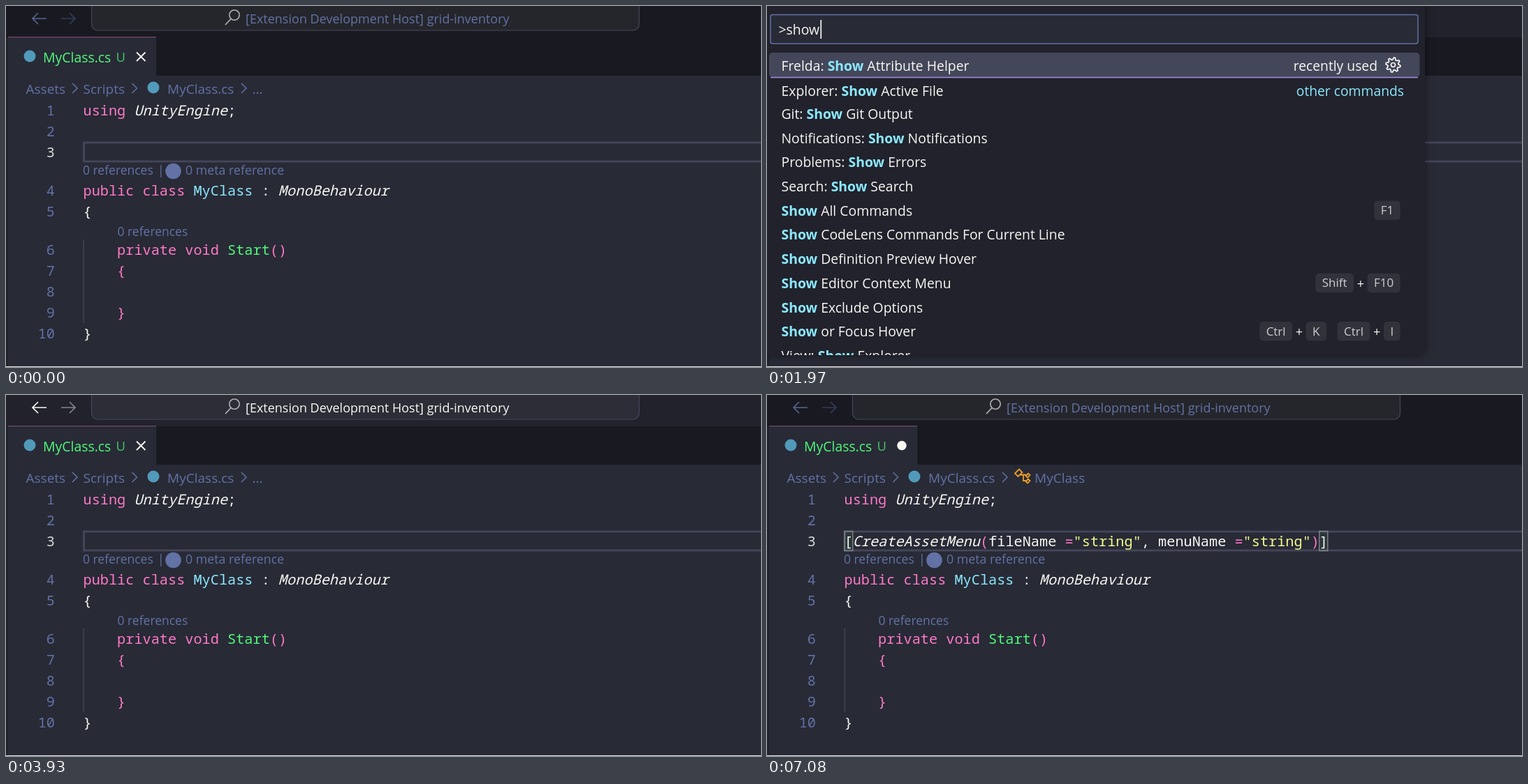
Animation, 1081 px wide and 518 px high, one loop 7.13 s. Source, as an HTML page:

```html
<!DOCTYPE html>
<html lang="en">
<head>
<meta charset="utf-8">
<title>Attribute helper demo</title>
<style>
  html, body { margin: 0; width: 100%; height: 100%; overflow: hidden; background: #282a36; }
  svg { display: block; width: 100%; height: 100%; }
  text { white-space: pre; font-family: "Open Sans", "Noto Sans", sans-serif; }
  .code { font-family: "Noto Sans Mono", "DejaVu Sans Mono", monospace; font-size: 20.25px; font-weight: 500; }
  .number { font-weight: 400; }
  .hit { font-weight: 700; fill: #8be9fd; }
</style>
</head>
<body>
<svg id="stage" viewBox="0 0 1081 518" xmlns="http://www.w3.org/2000/svg"></svg>
<script>
const LOOP = 7130;
const FG = '#f8f8f2', MUTED = '#6272a4', PINK = '#ff79c6', CYAN = '#8be9fd',
      GREEN = '#50fa7b', YELLOW = '#f1fa8c', DARK = '#191a21', PANEL = '#21222c',
      EDITOR = '#282a36', SELECT = '#44475a', ORANGE = '#ee9d28', BLUE = '#75beff';
const UI = 19.4, ROW = 34.7, LIST_TOP = 67, LIST_END = 501;

const stage = document.getElementById('stage');
const pen = document.createElement('canvas').getContext('2d');

function widthOf(str, size) {
  pen.font = `${size}px "Open Sans", "Noto Sans", sans-serif`;
  return pen.measureText(str).width;
}

// Drawing helpers
const rect = (x, y, w, h, fill, more = '') =>
  `<rect x="${x}" y="${y}" width="${w}" height="${h}" fill="${fill}" ${more}/>`;
const line = (d, color, w = 1.6) =>
  `<path d="${d}" fill="none" stroke="${color}" stroke-width="${w}"/>`;
const dot = (x, y, r, fill) => `<circle cx="${x}" cy="${y}" r="${r}" fill="${fill}"/>`;
const text = (x, y, str, fill = FG, size = UI, anchor = 'start') =>
  `<text x="${x}" y="${y}" fill="${fill}" font-size="${size}" text-anchor="${anchor}">${str}</text>`;
const at = (x, y, body) => `<g transform="translate(${x} ${y})">${body}</g>`;

// Each run is [text, color, italic]
const code = (x, y, ...runs) => `<text class="code" x="${x}" y="${y}">` +
  runs.map(([s, color = FG, italic]) =>
    `<tspan fill="${color}"${italic ? ' font-style="italic"' : ''}>${s}</tspan>`).join('') + '</text>';

const icons = {
  method: line('M0-10L9-5.5V5.5L0 10L-9 5.5V-5.5ZM-9-5.5L0-1L9-5.5M0-1V10', FG, 1.7),
  type: line('M-10.5-4.5l6-6 4.5 4.5-6 6zM-3-2.5h8.5M1.5-2.5v8.5h4' +
    'M5-1l3.5-3.5 2.5 2.5-3.5 3.5zM5 7l3.5-3.5 2.5 2.5-3.5 3.5z', ORANGE, 1.8),
  field: line('M-10.5-3L2-8.5L10.5-4.5V3.5L-2 9L-10.5 5ZM-10.5-3L-2 1L10.5-4.5M-2 1V9', BLUE, 1.7)
};

function gear() {
  const pts = [];
  for (let i = 0; i < 32; i++) {
    const a = (i + 0.5) * Math.PI / 16, r = i % 4 < 2 ? 10.5 : 7.6;
    pts.push(`${(r * Math.cos(a)).toFixed(2)} ${(r * Math.sin(a)).toFixed(2)}`);
  }
  return line(`M${pts.join('L')}Z`, FG, 1.7) +
    `<circle r="3" fill="none" stroke="${FG}" stroke-width="1.7"/>`;
}

// Window title, tab, breadcrumb
function chrome({ focus, dirty, crumb }) {
  const chevron = x => line(`M${x} 111l7 7-7 7`, MUTED, 1.5);
  const arrow = (x, dir, color) => line(`M${x} 18h${20 * dir}M${x + 8 * dir} 10l${-8 * dir} 8 ${8 * dir} 8`, color, 1.7);
  return rect(0, 0, 1081, 45, focus ? PANEL : DARK) +
    rect(122.5, -12, 784, 47, 'rgba(255,255,255,.05)', `rx="9" stroke="${SELECT}" stroke-width="1.2"`) +
    arrow(38, 1, focus ? FG : '#56648f') + arrow(99, -1, focus ? '#85858a' : '#353e59') +
    '<circle cx="327" cy="13" r="7.2" fill="none" stroke="#b0b0b2" stroke-width="1.6"/>' +
    line('M322 18.5l-8 8.5', '#b0b0b2', 1.8) +
    text(343, 25, '[Extension Development Host] grid-inventory', focus ? FG : MUTED, 18) +
    rect(215, 45, 866, 55, DARK) + rect(3, 45, 212, 55, EDITOR) + rect(3, 44, 212, 1.2, '#744a6c') +
    dot(34, 72, 8.5, '#519aba') +
    text(53, 81, 'MyClass.cs', GREEN, 19.4) + text(157.5, 80, 'U', '#42c968', 18.5) +
    (dirty ? dot(193, 72.5, 6.7, FG) : line('M187 66.5l12.5 12.5m0-12.5l-12.5 12.5', FG, 1.8)) +
    text(28.5, 125.5, 'Assets', MUTED, 19) + chevron(95) +
    text(110.5, 125.5, 'Scripts', MUTED, 19) + chevron(180.5) + dot(211, 117, 8.5, '#519aba') +
    text(231, 125.5, 'MyClass.cs', MUTED, 19) + chevron(337) +
    (crumb ? at(365.5, 117, icons.type) + text(383, 125.5, 'MyClass', MUTED, 19)
           : text(352.5, 125.5, '...', MUTED, 19));
}

function attribute(styled) {
  const str = ['"string"', styled ? YELLOW : FG], eq = ['=', styled ? PINK : FG];
  return code(110.5, 217, ['['], ['CreateAssetMenu', FG, styled], ['(', PINK], ['fileName '], eq, str,
    [', menuName '], eq, str, [')', PINK], [']']);
}

function editor({ caret, inserted, styled, brackets }) {
  const lines = [150, 180, 210, 265, 295, 350, 380, 410, 440, 470];
  const numbers = lines.map((y, i) =>
    `<text class="code number" x="70" y="${y + 7}" text-anchor="end" fill="${i === 2 ? '#d6d6d2' : MUTED}">${i + 1}</text>`);
  const box = x => rect(x, 195.5, 12, 28, 'rgba(80,250,123,.06)', 'stroke="#8a8b90" stroke-width="1.3"');
  return numbers.join('') +
    rect(111.5, 196, 1000, 27, 'none', `stroke="${SELECT}" stroke-width="2.8"`) +
    rect(110.5, 335, 1.4, 120, '#42444f') +
    code(110.5, 157, ['using ', PINK], ['UnityEngine', FG, true], [';']) +
    text(110, 242, '0 references', MUTED, 17.5) + text(217, 242, '|', MUTED, 17.5) +
    dot(239.5, 237, 11.3, MUTED) + text(257, 242, '0 meta reference', MUTED, 17.8) +
    code(110.5, 272, ['public class ', PINK], ['MyClass', CYAN], [' : '], ['MonoBehaviour', FG, true]) +
    code(110.5, 302, ['{']) + text(159.5, 330, '0 references', MUTED, 17.5) +
    code(159.1, 357, ['private void ', PINK], ['Start', GREEN], ['()', PINK]) +
    code(159.1, 387, ['{', PINK]) + code(159.1, 447, ['}', PINK]) + code(110.5, 477, ['}']) +
    (brackets ? box(110.8) + box(790.8) : '') +
    (inserted ? attribute(styled) : '') +
    (caret ? rect(caret, 194, 3, 31, FG) : '');
}

// Command list entries: [label, keys]
const recent = [
  ['Frelda: Show Attribute Helper'], ['Frelda: Focus on Meta Explorer View'],
  ['View: Close All Editors', 'Ctrl+K Ctrl+W'], ['Developer: Reload Window', 'Ctrl+R'],
  ['Extensions: Install from VSIX...'], ['Preferences: Open Settings (UI)'],
  ['Preferences: Color Theme', 'Ctrl+K Ctrl+T'], ['OmniSharp: Restart OmniSharp'],
  ['File: New Untitled Text File', 'Ctrl+N'], ['Git: Close All Diff Editors'],
  ['Developer: Reload Webviews']
];
const similar = [
  ['Show CodeLens Commands For Current Line'], ['Show Definition Preview Hover'],
  ['Show Editor Context Menu', 'Shift+F10'], ['Show Exclude Options'],
  ['Show or Focus Hover', 'Ctrl+K Ctrl+I']
];
const others = [
  ['.NET Install Tool: Report an issue with the .NET Install Tool.'], ['.NET: Build'],
  ['Explorer: Show Active File'], ['Git: Show Git Output'],
  ['Notifications: Show Notifications'], ['Problems: Show Errors'], ['Search: Show Search'],
  ['Show All Commands', 'F1'], ...similar,
  ['View: Show Explorer'], ['View: Show Extensions'], ['View: Show Testing']
];
const attributes = [
  ['ContextMenu', 'method'], ['CreateAssetMenu', 'type'], ['ExecuteInEditMode', 'type'],
  ['Header', 'field'], ['HideInInspector', 'field'], ['Multiline', 'field'], ['Range', 'field'],
  ['RequireComponent', 'type'], ['SerializeField', 'field'], ['Space', 'field'],
  ['TextArea', 'field'], ['Tooltip', 'field'], ['Min', 'field']
];

const filter = (list, query) => list.filter(([label]) => label.toLowerCase().includes(query));

function commandRows(query) {
  const q = query.trim(), fuzzy = q.startsWith('show a');
  const top = filter(recent, q).map(([label, keys]) => ({ label, keys, hit: q }));
  const source = !fuzzy ? filter(others, q) : q.length < 14 ? similar : [];
  const rest = source.map(([label, keys], i) => ({
    label, keys, hit: fuzzy ? '' : q,
    note: i ? '' : fuzzy ? 'similar commands' : 'other commands'
  }));
  return [...top, ...rest].slice(0, 13);
}

const attributeRows = query =>
  filter(attributes, query).map(([label, icon]) => ({ label, icon, hit: query }));

function marked(label, hit) {
  const i = hit ? label.toLowerCase().indexOf(hit) : -1;
  if (i < 0) return label;
  const end = i + hit.length;
  return `${label.slice(0, i)}<tspan class="hit">${label.slice(i, end)}</tspan>${label.slice(end)}`;
}

// Key caps laid out from the right edge
function keycaps(keys, y) {
  let x = 906, out = '';
  for (const chord of keys.split(' ').reverse()) {
    chord.split('+').reverse().forEach((key, i) => {
      if (i) {
        out += text(x - 10.5, y + 7.5, '+', FG, 18, 'middle');
        x -= 21;
      }
      const w = widthOf(key, 17) + 17.5;
      x -= w;
      out += rect(x, y - 13, w, 26, 'rgba(128,128,128,.17)', 'rx="4.5" stroke="#33343c" stroke-width="1.3"') +
        text(x + w / 2, y + 6, key, '#cfcfcf', 17, 'middle');
    });
    x -= 17;
  }
  return out;
}

function listRow({ label, keys, note, icon, hit }, i, command) {
  const y = 85.5 + ROW * i + (note ? 1.5 : 0);
  let out = '';
  if (!i) out += rect(3, LIST_TOP, 931.5, 35, SELECT, 'rx="5"');
  if (note) out += rect(5, y - 20, 927, 1.6, '#a487dc') + text(912, y + 7, note, CYAN, 19.3, 'end');
  if (icon) out += at(33, y - 0.5, icons[icon]);
  if (command && !i) out += text(874, y + 7, 'recently used', FG, 19.3, 'end') + at(896.5, y - 1, gear());
  if (keys) out += keycaps(keys, y - 0.5);
  return out + text(icon ? 51 : 20.5, y + 7, marked(label, hit));
}

function palette({ mode, query, bare, bar }) {
  const command = mode === 'command';
  const rows = bare ? [] : command ? commandRows(query) : attributeRows(query);
  const bottom = Math.min(LIST_TOP + rows.length * ROW + 8, LIST_END);
  const typed = (command ? '>' : '') + query;
  return rect(-6, -20, 948, bottom + 20, PANEL,
      'rx="9" style="filter:drop-shadow(0 0 6px rgba(0,0,0,.5))"') +
    rect(5, 12.5, 927, 41.5, EDITOR, `rx="3" stroke="${MUTED}" stroke-width="1.5"`) +
    text(16.5, 41, typed.replace('>', '&gt;')) +
    rect(17.8 + widthOf(typed, UI), 20, 1.7, 27, FG) +
    `<g clip-path="url(#list)">${rows.map((r, i) => listRow(r, i, command)).join('')}</g>` +
    (bar ? rect(926, LIST_TOP, 16, rows.length * ROW, 'rgba(121,121,121,.4)') : '');
}

// Timeline: every step changes part of the state
const steps = [];
const add = (time, change) => steps.push({ ...steps[steps.length - 1], ...change, time });
const type = (full, from, times) =>
  times.forEach((time, i) => add(time, { query: full.slice(0, from + i), bar: false }));

add(0, {});
add(490, { focus: true, caret: 110 });
add(1010, { caret: 0 });
add(1150, { mode: 'command', query: '', bare: true });
add(1210, { bare: false });
const phrase = 'show attribute helper';
type(phrase, 1, [1470, 1770, 1850, 1930, 2080, 2240, 2670, 2750]);
type(phrase, 9, Array.from({ length: 10 }, (_, i) => 2910 + Math.round(i * 71 / 9) * 10));
type(phrase, 19, [3720, 3780]);
add(3930, { mode: '' });
add(3980, { mode: 'attribute', query: '' });
add(4450, { query: 'c', bar: true });
type('createa', 2, [4640, 4690, 4730, 4780, 4830, 4880]);
add(5150, { mode: '', caret: 110 });
add(5180, { inserted: true, dirty: true, caret: 803 });
add(5220, { brackets: true });
add(5480, { styled: true });
add(5510, { crumb: true });
add(5660, { caret: 0 });
add(6120, { caret: 803 });
add(6670, { caret: 0 });
add(7080, { focus: false });

const render = state =>
  `<clipPath id="list"><rect y="60" width="942" height="${LIST_END - 60}"/></clipPath>` +
  rect(0, 0, 1081, 518, EDITOR) + rect(0, 45, 3, 473, PANEL) +
  chrome(state) + editor(state) + (state.mode ? palette(state) : '') +
  rect(0, 517, 1081, 1, '#e6e6ea');

const start = performance.now();
let shown = null;

function tick() {
  const t = (performance.now() - start) % LOOP;
  const state = steps.findLast(s => s.time <= t);
  if (state !== shown) {
    stage.innerHTML = render(state);
    shown = state;
  }
  requestAnimationFrame(tick);
}
tick();
</script>
</body>
</html>
```
